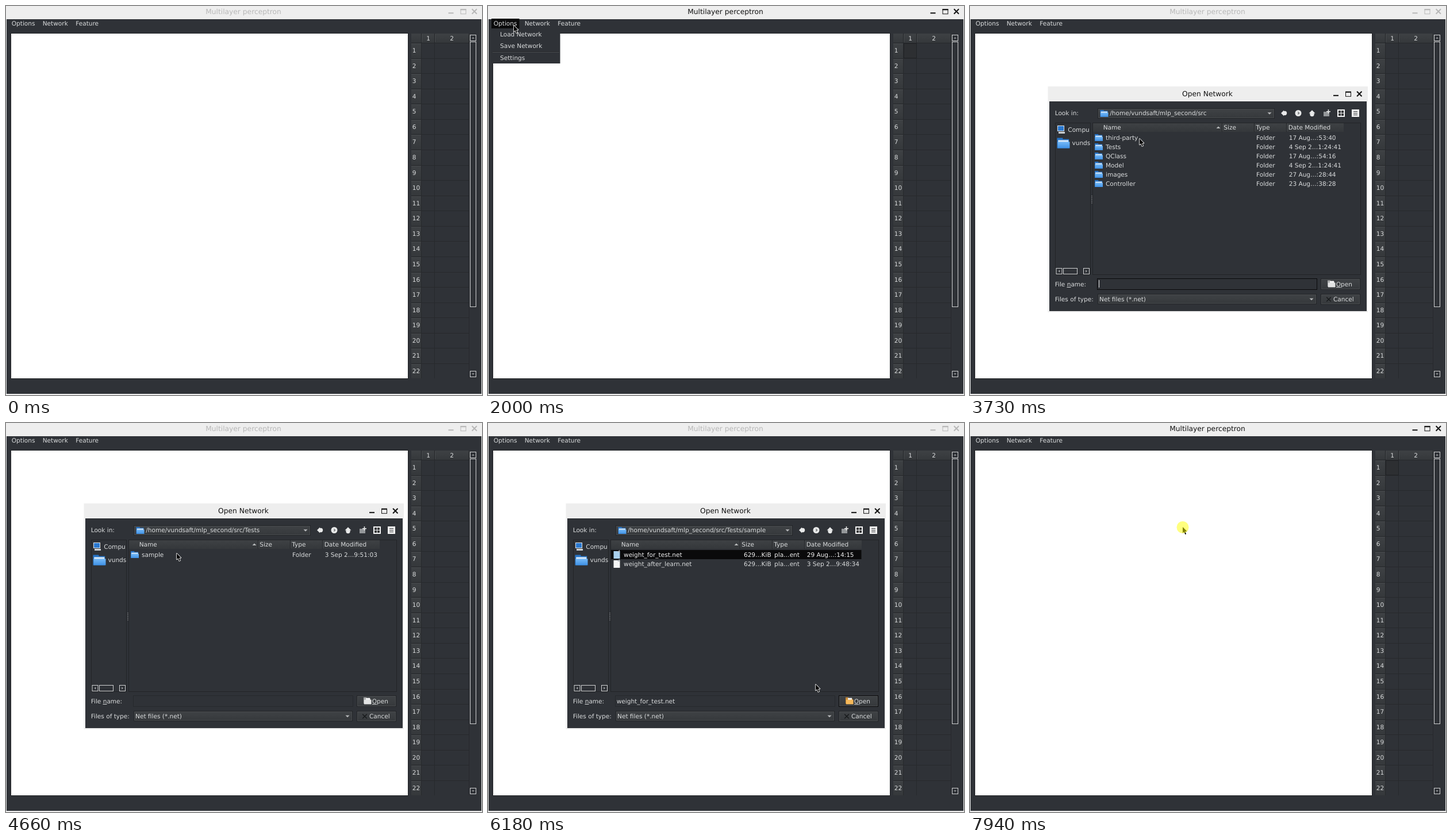
Write an HTML page with a canvas that moves like this. It is 828 px wide and 677 px high and loops after 8 s.

```html
<!DOCTYPE html>
<html lang="en">
<head>
<meta charset="utf-8">
<title>Multilayer perceptron</title>
<style>
html, body { margin: 0; width: 100%; height: 100%; overflow: hidden; background: #eee; }
canvas { display: block; }
</style>
</head>
<body>
<canvas id="stage" width="828" height="677"></canvas>
<script>
const ctx = document.getElementById('stage').getContext('2d');
const LOOP = 8000, APPEAR = 270, SIZE = 10.55, TITLE_SIZE = 12.28;
const BG = '#2f3237', INK = '#dadcdd', OUTLINE = '#222427', LIGHT = '#484b4e', BLACK = '#0a0a0b';
const FONT = 'px "DejaVu Sans", "Noto Sans", sans-serif';
const USER = 'vundsaft', ROOT = `/home/${USER}/mlp_second/src`;

// What the user does, in ms
const AT = {
  hover: 1250, menu: 1600, choose: 2520, dialog: 2620, pickTests: 3990, openTests: 4240,
  pickSample: 4800, openSample: 4960, pickFile: 5400, load: 6480, close: 6620, active: 6850, paint: 7940
};
const CLICKS = [[AT.menu, 300], [AT.choose, 120], [AT.pickTests, 250], [AT.pickSample, 90],
  [AT.openSample, 90], [AT.pickFile, 100], [AT.load, 120], [AT.paint, 100]];

// Pointer moves: start, end, x, y
const ENTRY = [767, 657];
const MOVES = [
  [270, 1070, 74, 50], [1090, 1420, 44, 31], [1900, 2260, 50, 48], [2520, 2650, 54, 52],
  [2720, 2850, 47, 59], [3060, 3850, 311, 242], [4280, 4640, 297, 227], [5190, 5240, 294, 229],
  [5530, 6190, 570, 455], [6230, 6400, 640, 485], [6825, 6990, 585, 437], [7080, 7670, 371, 188],
  [7820, 7900, 370, 181]
];

const folderRow = (name, date) => ({ name, date, type: 'Folder' });
const fileRow = (name, date) => ({ name, date, type: 'pla…ent', size: '629…KiB' });
const FOLDERS = [
  folderRow('third-party', '17 Aug…:53:40'), folderRow('Tests', '4 Sep 2…1:24:41'),
  folderRow('QClass', '17 Aug…:54:16'), folderRow('Model', '4 Sep 2…1:24:41'),
  folderRow('images', '27 Aug…:28:44'), folderRow('Controller', '23 Aug…:38:28')
];
const SUBFOLDERS = [folderRow('sample', '3 Sep 2…9:51:03')];
const FILES = [fileRow('weight_for_test.net', '29 Aug…:14:15'),
  fileRow('weight_after_learn.net', '3 Sep 2…9:48:34')];

const during = (t, a, b) => t >= a && t < b;

function rect(x, y, w, h, fill) {
  ctx.fillStyle = fill;
  ctx.fillRect(x, y, w, h);
}

function frame(x, y, w, h, color) {
  ctx.strokeStyle = color;
  ctx.lineWidth = 1;
  ctx.strokeRect(x + .5, y + .5, w - 1, h - 1);
}

function shade(x, y, w, h, top, bottom) {
  const g = ctx.createLinearGradient(0, y, 0, y + h);
  g.addColorStop(0, top);
  g.addColorStop(1, bottom);
  rect(x, y, w, h, g);
}

function circle(x, y, r, fill) {
  ctx.beginPath();
  ctx.arc(x, y, r, 0, 2 * Math.PI);
  ctx.fillStyle = fill;
  ctx.fill();
}

// Text centred vertically on y
function text(str, x, y, color = INK, align = 'left', size = SIZE) {
  ctx.font = size + FONT;
  ctx.textAlign = align;
  ctx.fillStyle = color;
  ctx.fillText(str, x, y + size * .346);
}

function triangle(x, y, r, turns = 0, fill = '#b8babb') {
  ctx.save();
  ctx.translate(x, y);
  ctx.rotate(turns * Math.PI / 2);
  ctx.beginPath();
  ctx.moveTo(-r, -r / 2);
  ctx.lineTo(r, -r / 2);
  ctx.lineTo(0, r / 2);
  ctx.fillStyle = fill;
  ctx.fill();
  ctx.restore();
}

function cross(x, y, r, color, width) {
  ctx.beginPath();
  for (const s of [-1, 1]) {
    ctx.moveTo(x - r, y - r * s);
    ctx.lineTo(x + r, y + r * s);
  }
  ctx.strokeStyle = color;
  ctx.lineWidth = width;
  ctx.stroke();
}

function raised(x, y, w, h, outline = OUTLINE) {
  shade(x, y, w, h, '#404346', '#35383b');
  frame(x, y, w, h, outline);
  frame(x + 1, y + 1, w - 2, h - 2, LIGHT);
}

function header(x, y, w, h) {
  shade(x, y, w, h, '#3e4144', '#35383b');
}

function divider(x, y, h) {
  rect(x, y, 1, h, OUTLINE);
  rect(x + 1, y + 1, 1, h - 2, LIGHT);
}

function titleBar(title, right, y, color) {
  text(title, 413, y, color, 'center', TITLE_SIZE);
  rect(right - 50, y + 2, 9, 2, color);
  frame(right - 29, y - 4, 10, 9, color);
  rect(right - 29, y - 4, 10, 2, color);
  cross(right - 4.7, y + .2, 4.2, color, 2);
}

function scrollButton(x, y, turns) {
  frame(x, y, 11, 11, '#d0d1d2');
  triangle(x + 5.5, y + 5.5, 2.2, turns);
}

function folder(x, y, w, h) {
  rect(x, y, w * .45, h * .2, '#2673c6');
  rect(x, y + h * .12, w * .94, h * .88, '#2673c6');
  rect(x + w * .08, y + h * .22, w * .82, h * .2, '#dceaf7');
  shade(x + w * .04, y + h * .38, w * .96, h * .62, '#75b9f7', '#3f91e5');
}

function page(x, y, color) {
  rect(x, y, 11, 13, color);
  triangle(x + 9.5, y + 1, 3, -.5, '#b7bdc2');
}

function table(active) {
  const pitch = 26.57;
  header(705, 48, 101, 16);
  for (let i = 0; i < 22; i++) {
    const y = Math.round(64 + pitch * i);
    header(705, y, 18, Math.min(27, 648 - y));
    rect(705, y, 18, 1, OUTLINE);
    rect(705, y + 1, 18, 1, LIGHT);
    rect(723, y, 83, 1, '#27292c');
    text(String(i + 1), 706.7, y + pitch / 2 + .2);
  }
  for (const x of [722, 745, 805]) {
    divider(x, 48, 16);
    rect(x, 64, 1, 584, '#27292c');
  }
  text('1', 734.5, 56.3, INK, 'center');
  text('2', 775.5, 56.3, INK, 'center');
  if (active) {
    rect(723, 65, 23, 26, '#2d2f32');
    frame(723, 65, 23, 26, '#212326');
  }
  scrollButton(807, 50, 2);
  scrollButton(807, 635, 0);
  frame(807, 62, 11, 462, '#d0d1d2');
}

function mainWindow(active) {
  rect(0, 0, 828, 677, '#eee');
  titleBar('Multilayer perceptron', 819.5, 9.3, active ? '#111' : '#b8b8b8');
  rect(1, 23, 826, 652, BG);
  frame(8, 47, 692, 602, OUTLINE);
  rect(9, 48, 690, 600, '#fff');
  table(active);
}

function menuBar(hot) {
  if (hot) rect(6, 22, 48.5, 17, BLACK);
  text('Options', 9.8, 30.6);
  text('Network', 63.7, 30.6);
  text('Feature', 121.2, 30.6);
}

function menu(hot) {
  rect(6, 39, 119.5, 61, BG);
  if (hot) rect(6, 40, 119.5, 19, BLACK);
  text('Load Network', 21, 49.5);
  text('Save Network', 21, 69.2);
  rect(8, 79, 116, 1, '#26282b');
  rect(8, 80, 116, 1, LIGHT);
  text('Settings', 21, 90.2);
}

function toolbar() {
  const y = 186.5, ink = '#e8e9e9', dark = '#2a2d30';
  circle(547.5, y, 3.7, ink);
  triangle(543.5, y, 5, 1, ink);
  circle(571, y, 5.5, ink);
  triangle(572, y, 3, -1, '#777a7d');
  circle(595, y + 2, 3.7, ink);
  triangle(595, y - 2.5, 5.5, 2, ink);
  rect(615, 184, 10, 8, '#94979a');
  rect(620, 183, 7, 1.5, ink);
  rect(622.7, 180, 1.5, 7, ink);
  for (const x of [639, 664]) rect(x, 180, 13, 13, '#f2f2f2');
  for (let i = 0; i < 4; i++) rect(641 + 5 * (i % 2), 182 + 5 * (i >> 1), 4, 4, dark);
  for (let i = 0; i < 3; i++) rect(667, 183 + 3 * i, 7, 1, dark);
}

function sidebar() {
  frame(148, 203, 62, 265, OUTLINE);
  rect(152, 208, 12, 10, '#e0e5e9');
  rect(153, 209, 10, 8, '#2a78cf');
  rect(154, 219, 11, 3, '#cfd3d6');
  text('Compu', 170.3, 215);
  folder(151.5, 229.5, 22, 18);
  text(USER.slice(0, 5), 177.5, 238);
  scrollButton(149.5, 456, 1);
  scrollButton(197, 456, -1);
  frame(162, 456, 25, 11, '#d0d1d2');
  for (let y = 330; y < 345; y += 3) rect(211.5, y, 1, 1.5, '#9a9c9e');
}

function fileList(items, selected) {
  frame(213, 203, 467, 265, OUTLINE);
  header(214, 204, 436, 15);
  for (const x of [438, 494, 550]) divider(x, 204, 15);
  text('Name', 231.7, 211.4);
  text('Size', 441.3, 211.4);
  text('Type', 497.3, 211.4);
  text('Date Modified', 553.7, 211.4);
  triangle(432, 211.3, 3.5, 2);
  items.forEach((item, i) => {
    const y = 221 + 16 * i, mid = y + 8.2, hot = i === selected, ink = hot ? '#f2f2f2' : INK;
    if (hot) rect(214, y, 435.5, 16, BLACK);
    if (item.size) page(218.5, y + 2, hot ? '#a8d0ee' : '#f5f6f6');
    else folder(217, y + 2, 14, 12);
    text(item.name, 236, mid, ink);
    text(item.size || '', 492.7, mid, ink, 'right');
    text(item.type, 498, mid, ink);
    text(item.date, 554.7, mid, ink);
  });
}

function openIcon(x, y, enabled) {
  const [back, front] = enabled ? ['#c98a35', '#f5b95a'] : ['#a9abac', '#e2e3e3'];
  rect(x, y, 5, 3, back);
  rect(x, y + 2, 12, 9, back);
  rect(x + 4, y + 1, 7, 5, '#f4f4f4');
  rect(x + 1, y + 4, 12.5, 8, front);
}

function fileFields(s) {
  text('File name:', 147.7, 483.9);
  rect(168.5, 489, 7, 1, INK);
  frame(221, 474, 383, 20, s.focus ? BLACK : '#26292c');
  text(s.file, 223.7, 483.9);
  if (s.caret) rect(224, 477, 1, 13, '#e6e6e6');

  raised(610, 474, 69, 20, s.file ? BLACK : OUTLINE);
  openIcon(622, 477.5, s.file);
  text('Open', 636.8, 483.9);
  rect(637, 489, 8, 1, INK);

  text('Files of type:', 147.7, 510.5);
  raised(222, 501, 381, 18);
  text('Net files (*.net)', 225, 510.4);
  triangle(594, 510.5, 3.5);
  raised(610, 501, 69, 19);
  cross(624, 510.5, 3.8, '#17191b', 1.4);
  text('Cancel', 632, 510.5);
}

function dialog(s) {
  rect(135.5, 140, 556.5, 393, '#eee');
  titleBar('Open Network', 682, 152.8, '#111');
  rect(138, 166, 552, 365, BG);
  text('Look in:', 147.7, 186.6);
  raised(222, 178, 308, 18);
  folder(226.5, 181, 14, 12);
  text(s.dir, 243.3, 186.6);
  triangle(521, 187, 3.5);
  toolbar();
  sidebar();
  fileList(s.items, s.selected);
  fileFields(s);
}

function view(dir, items, picked) {
  return { dir: ROOT + dir, items, selected: picked, file: picked < 0 ? '' : items[picked].name };
}

function dialogState(t) {
  if (t >= AT.openSample) return view('/Tests/sample', FILES, t < AT.pickFile ? -1 : 0);
  if (t >= AT.openTests) return view('/Tests', SUBFOLDERS, t < AT.pickSample ? -1 : 0);
  const focus = t < AT.pickTests;
  const caret = focus && (t - AT.dialog) % 1000 < 500;
  return { ...view('', FOLDERS, focus ? -1 : 1), focus, caret };
}

function pointerAt(t) {
  let [x, y] = ENTRY;
  for (const [start, end, toX, toY] of MOVES) {
    const u = Math.min(1, Math.max(0, (t - start) / (end - start)));
    const ease = u * u * (3 - 2 * u);
    x += (toX - x) * ease;
    y += (toY - y) * ease;
  }
  return [x, y];
}

function pointer(x, y, pressed) {
  ctx.save();
  ctx.translate(Math.round(x), Math.round(y));
  ctx.beginPath();
  [[0, 0], [0, 10.5], [2.4, 8.3], [4.3, 13], [6.1, 12.2], [4.2, 7.8], [7.4, 7.6]]
    .forEach(p => ctx.lineTo(...p));
  ctx.closePath();
  ctx.lineJoin = 'round';
  ctx.strokeStyle = '#fff';
  ctx.lineWidth = 1.6;
  ctx.stroke();
  ctx.fillStyle = '#000';
  ctx.fill();
  if (pressed) circle(0, .5, 10.5, 'rgba(255,255,0,.5)');
  ctx.restore();
}

function draw(t) {
  ctx.textRendering = 'geometricPrecision';
  const [x, y] = pointerAt(t);
  mainWindow(during(t, AT.menu, AT.dialog) || t >= AT.active);
  menuBar(during(t, AT.hover, AT.dialog));
  if (during(t, AT.menu, AT.dialog)) menu(y >= 40);
  if (during(t, AT.dialog, AT.close)) dialog(dialogState(t));
  if (t >= APPEAR) pointer(x, y, CLICKS.some(([at, hold]) => during(t, at, at + hold)));
}

const start = performance.now();
function tick() {
  draw((performance.now() - start) % LOOP);
  requestAnimationFrame(tick);
}
tick();
</script>
</body>
</html>
```
